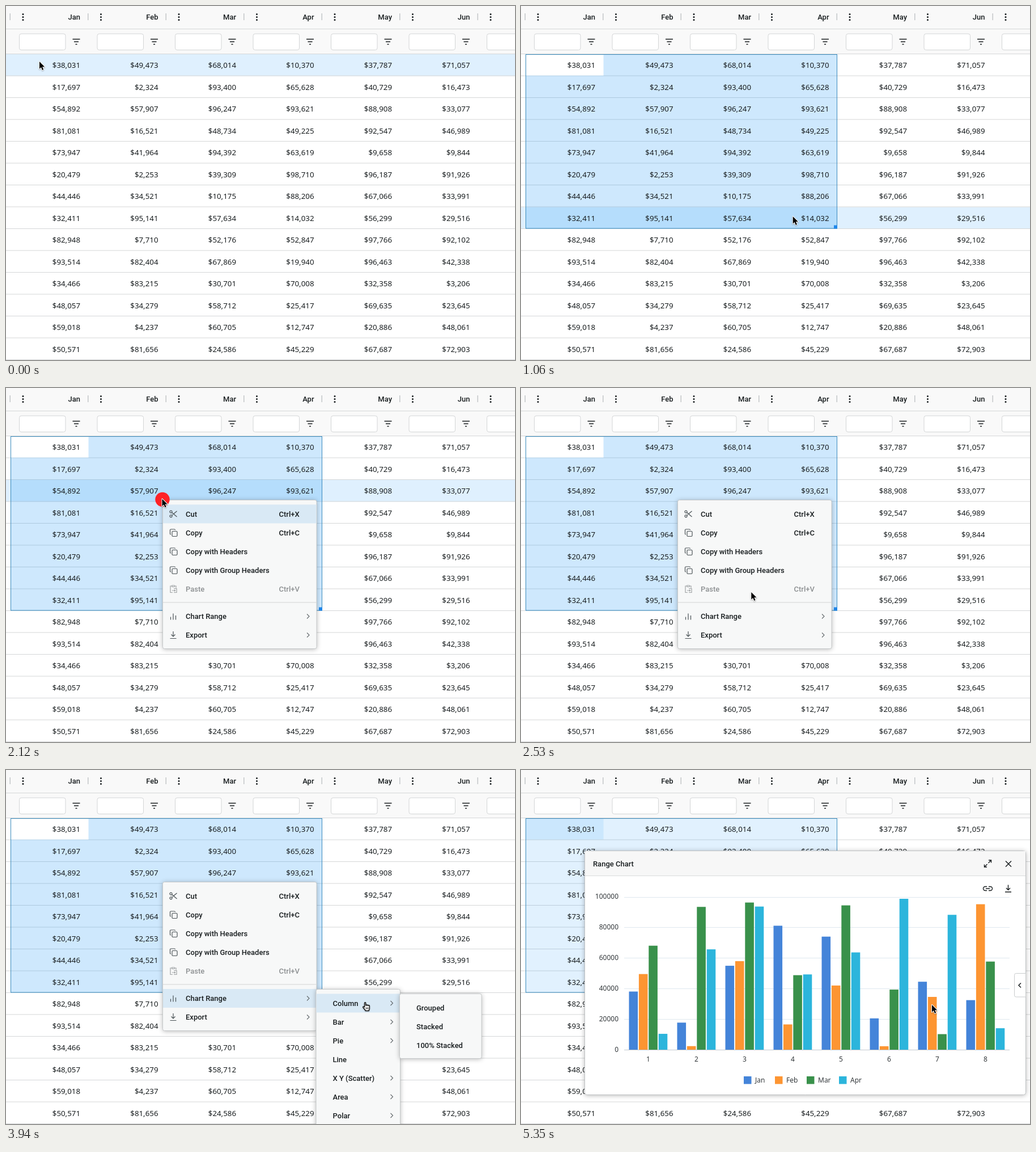
Animation of 898x624 px, one loop 8 s. Source, as an HTML page with a canvas:

```html
<!DOCTYPE html>
<html lang="en">
<head>
<meta charset="utf-8">
<title>Range chart from a grid selection</title>
<style>
  html, body { margin: 0; width: 100%; height: 100%; overflow: hidden; background: #fff; }
  canvas { display: block; }
</style>
</head>
<body>
<canvas id="stage" width="898" height="624"></canvas>
<script>
const ctx = document.getElementById('stage').getContext('2d');
const LOOP = 8000, COL = 137.5, ROW = 38.5, LEFT = 8, TOP = 85;
const INK = '#181d1f', LINE = '#d5d7d8', BLUE = '33,150,243', FRAME = '#3b8bbd';
const LABEL = '500 13px Roboto, sans-serif';
const NUMBER = '13.3px "Noto Sans", sans-serif';
const AXIS = '12px "Noto Sans", sans-serif';

const months = ['Jan', 'Feb', 'Mar', 'Apr', 'May', 'Jun'];
const colors = ['#4484d9', '#fd9532', '#39914b', '#2cb5dc'];
const grid = [
  [38031, 49473, 68014, 10370, 37787, 71057],
  [17697, 2324, 93400, 65628, 40729, 16473],
  [54892, 57907, 96247, 93621, 88908, 33077],
  [81081, 16521, 48734, 49225, 92547, 46989],
  [73947, 41964, 94392, 63619, 9658, 9844],
  [20479, 2253, 39309, 98710, 96187, 91926],
  [44446, 34521, 10175, 88206, 67066, 33991],
  [32411, 95141, 57634, 14032, 56299, 29516],
  [82948, 7710, 52176, 52847, 97766, 92102],
  [93514, 82404, 67869, 19940, 96463, 42338],
  [34466, 83215, 30701, 70008, 32358, 3206],
  [48057, 34279, 58712, 25417, 69635, 23645],
  [59018, 4237, 60705, 12747, 20886, 48061],
  [50571, 81656, 24586, 45229, 67687, 72903]
];

const icons = {
  cut: 'M4 10.3a2 2 0 1 1-4 0a2 2 0 1 1 4 0M4 2.7a2 2 0 1 1-4 0a2 2 0 1 1 4 0M3.6 4L12.5 11.5M3.6 9L12.5 1.5',
  copy: 'M5.5 4H11.5Q13 4 13 5.5V11.5Q13 13 11.5 13H5.5Q4 13 4 11.5V5.5Q4 4 5.5 4ZM2 9.5H1.5Q.5 9.5 .5 8V2Q.5 .5 2 .5H8Q9.5 .5 9.5 2',
  paste: 'M4 1.5H1V13H5M8 1.5H11V5M4 .5H8V3H4ZM7 6H12V13H7M4 9.5H9.5M8 8L9.5 9.5L8 11',
  chart: 'M1.5 7.5V12.5M6 1.5V12.5M10.5 5V12.5',
  download: 'M6 0V9M2.5 5.5L6 9L9.5 5.5M.5 12.5H11.5',
  right: 'M0 0L4 4L0 8',
  left: 'M4 0L0 4L4 8',
  expand: 'M8 .5H12.5V5M12.5 .5L7.5 5.5M.5 8V12.5H5M.5 12.5L5.5 7.5',
  close: 'M0 0L10 10M10 0L0 10',
  link: 'M7 0H4A3.5 3.5 0 0 0 4 7H7M10 0H13A3.5 3.5 0 0 1 13 7H10M5 3.5H12',
  filter: 'M0 0H13M2.5 4.5H10.5M5 9H8'
};
for (const name in icons) icons[name] = new Path2D(icons[name]);
const arrow = new Path2D('M0 0V12.8L3 10L5 15L7.2 14L5.1 9.3H9.2Z');
const hand = new Path2D('M3.5 9V1.6a1.1 1.1 0 0 1 2.2 0V6a1.1 1.1 0 0 1 2.2 0a1.1 1.1 0 0 1 2.2 .4' +
  'a1.1 1.1 0 0 1 2.2 .6V11C12.3 13 11.3 13.5 11.1 15.3H5.2C5 13.5 2.5 12 .8 9.3C.2 8.2 1.6 7.4 2.4 8.3Z');

const mainMenu = {
  x: 276.5, y: 197.5, w: 271.5, h: 262, textX: 317,
  items: [
    { text: 'Cut', icon: 'cut', key: 'Ctrl+X' },
    { text: 'Copy', icon: 'copy', key: 'Ctrl+C' },
    { text: 'Copy with Headers', icon: 'copy' },
    { text: 'Copy with Group Headers', icon: 'copy' },
    { text: 'Paste', icon: 'paste', key: 'Ctrl+V', disabled: true },
    { text: 'Chart Range', icon: 'chart', more: true, gap: 15.5 },
    { text: 'Export', icon: 'download', more: true, gap: 15.5 }
  ]
};
const chartMenu = {
  x: 547, y: 386.5, w: 148.5, h: 300, textX: 576.5,
  items: ['Column', 'Bar', 'Pie', 'Line', 'X Y (Scatter)', 'Area', 'Polar']
    .map(text => ({ text, more: text !== 'Line' }))
};
const columnMenu = {
  x: 694.5, y: 394.5, w: 144.5, h: 114, textX: 724,
  items: ['Grouped', 'Stacked', '100% Stacked'].map(text => ({ text }))
};

// Pointer moves: start, end, x, y, ease-out power
const moves = [
  [260, 820, 481, 372, 1.6],
  [1060, 1590, 275.5, 195.5, 3.3],
  [2250, 2650, 419, 376, 2],
  [2710, 2820, 421, 404, 1],
  [3060, 3760, 633, 409, 1.65],
  [3940, 4290, 725, 414, 2]
];
const clicks = [60, 1880, 4590];
const MENU_OPEN = 2050, SUB_OPEN = 3070, COLUMN_OPEN = 3600, MENU_CLOSE = 4820, CHART_OPEN = 4870;

const easeOut = (t, start, end, power) =>
  1 - (1 - Math.min(1, Math.max(0, (t - start) / (end - start)))) ** power;

function pointerAt(t) {
  let x = 59, y = 98;
  for (const [start, end, toX, toY, power] of moves) {
    const k = easeOut(t, start, end, power);
    x += (toX - x) * k;
    y += (toY - y) * k;
  }
  return { x, y };
}

function rect(x, y, w, h, color) {
  ctx.fillStyle = color;
  ctx.fillRect(x, y, w, h);
}

function text(str, x, baseline, font = LABEL, align = 'left', color = INK) {
  ctx.font = font;
  ctx.textAlign = align;
  ctx.fillStyle = color;
  ctx.fillText(str, x, baseline);
}

function icon(name, x, y, color = '#4a5256', width = 1.2) {
  ctx.save();
  ctx.translate(x, y);
  ctx.strokeStyle = color;
  ctx.lineWidth = width;
  ctx.stroke(icons[name]);
  ctx.restore();
}

function box(x, y, w, h, radius, fill, border, shadow = 0) {
  ctx.save();
  ctx.beginPath();
  ctx.roundRect(x, y, w, h, radius);
  if (shadow) {
    ctx.shadowColor = 'rgba(0,0,0,.3)';
    ctx.shadowBlur = shadow;
    ctx.shadowOffsetY = 1;
  }
  ctx.fillStyle = fill;
  ctx.fill();
  ctx.shadowColor = 'transparent';
  ctx.strokeStyle = border;
  ctx.lineWidth = 1;
  ctx.stroke();
  ctx.restore();
}

function dot(x, y, r, color) {
  ctx.fillStyle = color;
  ctx.beginPath();
  ctx.arc(x, y, r, 0, 7);
  ctx.fill();
}

function drawHeader() {
  rect(0, 0, 898, 84, '#f9f9f9');
  rect(0, 40, 898, 1, LINE);
  rect(0, 84, 898, 1, LINE);
  for (let c = 0; c < 7; c++) {
    const x = c * COL;
    rect(x + 6.5, 13, 1.5, 12, '#c4c7c9');
    for (const y of [14.5, 19.5, 24.5]) dot(x + 30, y, 1.5, INK);
    box(x + 23.5, 49, 81.5, 28.5, 3.5, '#fff', '#d3d5d6');
    if (c < 6) {
      icon('filter', x + 117.5, 58.5, INK, 1.3);
      text(months[c], x + 131, 24, LABEL, 'right');
    }
  }
}

function drawSelection(cols, rows, chartOpen) {
  const w = cols * COL, h = rows * ROW - .5;
  if (chartOpen) {
    rect(LEFT, TOP, w, h, `rgba(${BLUE},.135)`);
    rect(LEFT, TOP, COL, ROW - 1, `rgba(${BLUE},.11)`);
  } else {
    rect(LEFT, TOP, w, h, `rgba(${BLUE},.22)`);
    rect(LEFT, TOP, COL, ROW - 1, '#fff');
  }
  ctx.strokeStyle = FRAME;
  ctx.lineWidth = 1;
  ctx.strokeRect(LEFT + .5, TOP + .5, w - 1, h - 1);
  if (!chartOpen) rect(LEFT + w - 6, TOP + h - 6, 6, 6, '#2188ea');
}

function drawRows(hoverRow, selection, chartOpen) {
  if (hoverRow >= 0) rect(0, TOP + hoverRow * ROW, 898, ROW, `rgba(${BLUE},.14)`);
  grid.forEach((_, r) => rect(0, TOP + (r + 1) * ROW - 1, 898, 1, LINE));
  if (selection) drawSelection(selection.cols, selection.rows, chartOpen);
  grid.forEach((row, r) => row.forEach((value, c) =>
    text('$' + value.toLocaleString('en-US'), 131 + c * COL, 109 + r * ROW, NUMBER, 'right')));
}

const itemTop = (menu, i) => menu.y + 8 + i * 33 + (menu.items[i].gap || 0);

function itemAt(menu, p) {
  if (p.x < menu.x || p.x > menu.x + menu.w) return -1;
  return menu.items.findIndex((item, i) => {
    const top = itemTop(menu, i);
    return !item.disabled && p.y >= top && p.y < top + 33;
  });
}

function drawMenu(menu, active) {
  box(menu.x, menu.y, menu.w, menu.h, 3, '#f7f8f8', '#c6c9ca', 8);
  menu.items.forEach((item, i) => {
    const top = itemTop(menu, i), color = item.disabled ? '#8d9092' : INK;
    if (i === active) rect(menu.x + .5, top, menu.w - 1, 33, '#d9e9f5');
    if (item.icon) icon(item.icon, menu.x + 12.5, top + 10, item.disabled ? '#a0a3a5' : '#4a5256');
    text(item.text, menu.textX, top + 21, LABEL, 'left', color);
    if (item.key) text(item.key, 481.5, top + 21, LABEL, 'left', color);
    if (item.more) icon('right', menu.x + menu.w - 17, top + 12.5, '#63696c', 1.1);
  });
  if (menu === mainMenu) rect(menu.x + .5, 377.5, menu.w - 1, 1, '#d3d5d6');
}

function drawChart(growth) {
  box(112.5, 142.5, 778, 430, 4, '#fff', '#bfc2c4', 8);
  rect(113, 143, 777, 43, '#f7f7f7');
  rect(113, 186, 777, 1, '#d9dbdc');
  text('Range Chart', 127, 169.5);
  icon('expand', 817, 158.5, INK, 1.4);
  icon('close', 855, 160.5, INK, 1.5);
  icon('link', 815, 205.5, INK, 1.4);
  icon('download', 853.5, 202.5, INK, 1.4);

  for (let i = 0; i <= 5; i++) {
    const y = 493 - i * 53.9;
    rect(182, Math.round(y), 680, 1, i ? '#dfe8ef' : '#c3cad0');
    text(i * 20000, 172, y + 3.5, AXIS, 'right', '#33383b');
  }
  for (let g = 0; g < 8; g++) {
    const x = 190.5 + g * 85;
    colors.forEach((color, s) => {
      const h = grid[g][s] * .002695 * growth;
      rect(x + s * 17.4, 493 - h, 15.6, h, color);
    });
    text(g + 1, x + 34, 513.5, AXIS, 'center', '#33383b');
  }
  colors.forEach((color, s) => {
    const x = [393, 448, 504, 561][s];
    rect(x, 540, 13.5, 13.5, color);
    text(months[s], x + 20, 550.5, AXIS, 'left', '#33383b');
  });
  box(870.5, 358.5, 20, 41.5, [3, 0, 0, 3], '#fff', '#c9cccd');
  icon('left', 878, 375.5, INK, 1.5);
}

function drawPointer(t, p, isHand) {
  for (const start of clicks) {
    const age = t - start;
    if (age < 0 || age > 400) continue;
    dot(p.x + .5, p.y + 1, age < 150 ? 20 * age / 150 : 20 * (400 - age) / 250, '#ff2226');
  }
  ctx.save();
  ctx.translate(p.x - (isHand ? 4.5 : 0), p.y);
  ctx.lineJoin = 'round';
  ctx.shadowColor = 'rgba(0,0,0,.3)';
  ctx.shadowBlur = 2;
  ctx.shadowOffsetY = 1;
  ctx.strokeStyle = isHand ? '#000' : '#fff';
  ctx.fillStyle = isHand ? '#fff' : '#000';
  ctx.lineWidth = isHand ? 1.2 : 2;
  const shape = isHand ? hand : arrow;
  if (isHand) ctx.fill(shape);
  ctx.stroke(shape);
  ctx.shadowColor = 'transparent';
  if (isHand) {
    ctx.lineWidth = .8;
    ctx.stroke(new Path2D('M6.2 9.5V12.5M8 9.5V12.5M9.8 9.5V12.5'));
  } else ctx.fill(shape);
  ctx.restore();
}

function draw(t) {
  const p = pointerAt(t);
  const menuOpen = t >= MENU_OPEN && t < MENU_CLOSE;
  const chartOpen = t >= CHART_OPEN;
  const inMenu = menuOpen && p.x > mainMenu.x && p.y > mainMenu.y;
  const pointerRow = Math.floor((p.y + 1 - TOP) / ROW);
  const hovering = t < clicks[0] || (t > 1060 && t < MENU_CLOSE && !inMenu);

  let selection = null;
  if (t >= clicks[0]) {
    selection = t < 1060
      ? { cols: Math.floor((p.x - LEFT) / COL) + 1, rows: pointerRow + 1 }
      : { cols: 4, rows: 8 };
  }

  rect(0, 0, 898, 624, '#fff');
  drawHeader();
  drawRows(hovering && t < MENU_CLOSE ? pointerRow : -1, selection, chartOpen);

  let isHand = false;
  if (menuOpen) {
    const subOpen = t >= SUB_OPEN, columnOpen = t >= COLUMN_OPEN;
    const mainItem = itemAt(mainMenu, p), chartItem = itemAt(chartMenu, p);
    drawMenu(mainMenu, subOpen ? 5 : inMenu ? mainItem : 0);
    if (subOpen) drawMenu(chartMenu, columnOpen ? 0 : chartItem);
    if (columnOpen) drawMenu(columnMenu, itemAt(columnMenu, p));
    isHand = inMenu && (mainItem >= 0 || subOpen);
  }
  if (chartOpen) drawChart(easeOut(t, CHART_OPEN, 5350, 2));
  drawPointer(t, p, isHand);
}

function frame() {
  draw(performance.now() % LOOP);
  requestAnimationFrame(frame);
}
frame();
</script>
</body>
</html>
```
